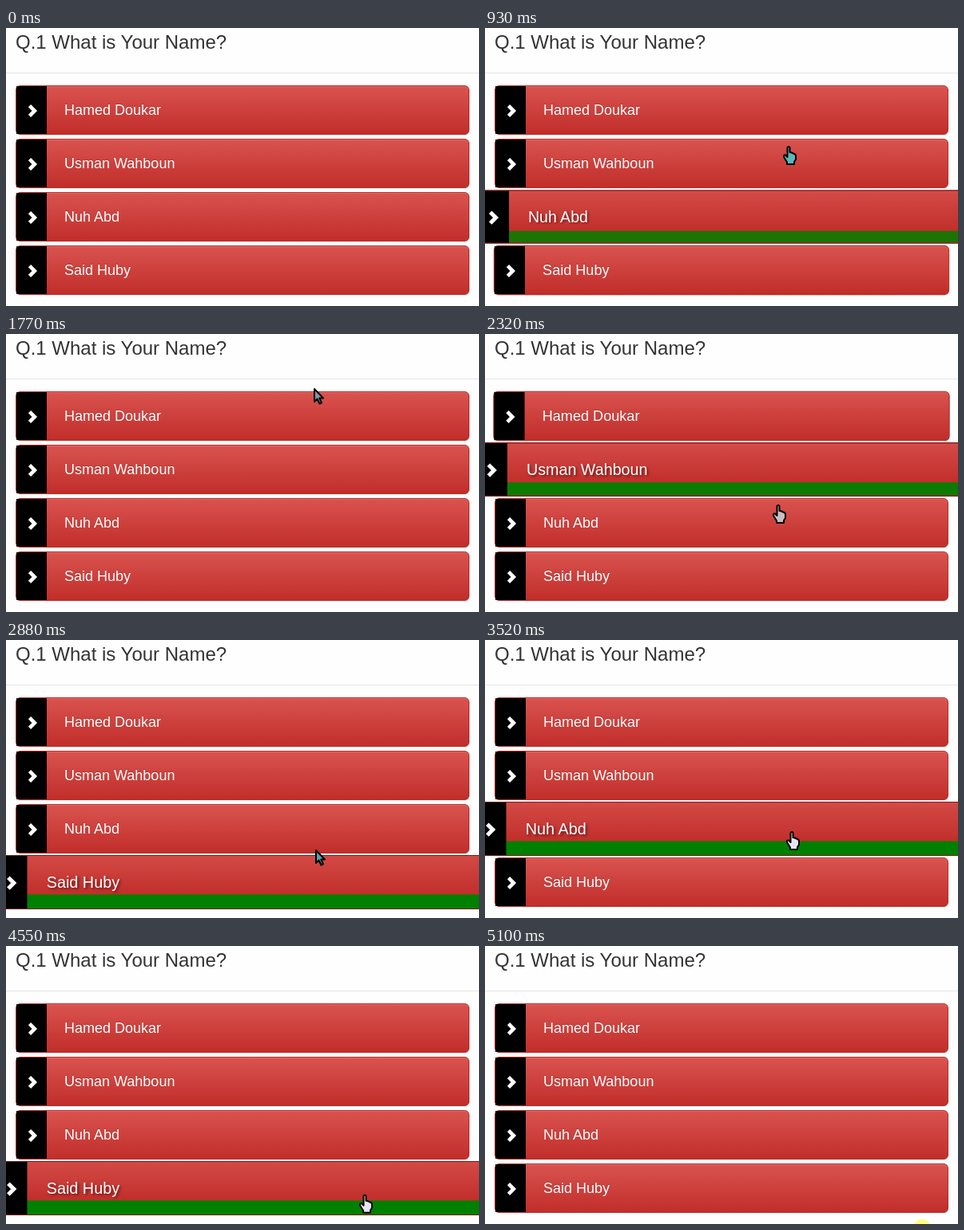
These frames come from a looping animation (592x349 px, 5230 ms). An HTML page:

```html
<!DOCTYPE html>
<html lang="en">
<head>
<meta charset="utf-8">
<title>Question list</title>
<style>
  html, body { margin: 0; width: 100%; height: 100%; overflow: hidden; background: #fefefe; }
  body { position: relative; font-family: "Liberation Sans", Arial, sans-serif; }
  h1 { position: absolute; left: 12px; top: 4px; margin: 0; font: 24px/28px "Liberation Sans", Arial, sans-serif; color: #333; white-space: nowrap; }
  hr { position: absolute; left: 0; top: 56px; width: 100%; height: 1px; margin: 0; border: 0; background: #e5e5e5; }
  .row {
    --p: 0;
    position: absolute; left: 12px; width: 568px; height: 62px; box-sizing: border-box;
    padding-left: 60px; font-size: 18px; line-height: 60px; color: #fff; white-space: nowrap;
    border: 1px solid color-mix(in srgb, #b92c28, #761c19 calc(var(--p) * 100%));
    border-radius: 6px;
    background: #c12e2a linear-gradient(#d9534f, #c12e2a) 0 calc(-15px * var(--p)) repeat-x;
    box-shadow:
      inset 0 calc(-16px * var(--p)) 0 rgba(0, 128, 0, var(--p)),
      inset 0 1px 0 rgba(255, 255, 255, calc(.15 - .15 * var(--p))),
      0 1px 1px rgba(0, 0, 0, .075);
    text-shadow: calc(2px * var(--p)) calc(3px * var(--p) - 1px) calc(3px * var(--p))
      rgba(0, 0, 0, calc(.2 + .3 * var(--p)));
    transform: scale(calc(1 + .1 * var(--p)));
  }
  .row svg { position: absolute; left: 0; top: 0; background: #000; }
  #cursor { position: absolute; left: 0; top: 0; overflow: visible; stroke: #000; stroke-width: 2; stroke-linejoin: round; }
  #halo { position: absolute; left: 536px; top: 343px; width: 22px; height: 22px; border-radius: 50%; background: #ffff80; }
</style>
</head>
<body>
<h1>Q.1 What is Your Name?</h1>
<hr>
<div id="halo"></div>
<script>
const LOOP = 5230, FADE = 300, STEP = 70;
const names = ['Hamed Doukar', 'Usman Wahboun', 'Nuh Abd', 'Said Huby'];

// Row index, hover start, hover end
const hovers = [
  [3, 700, 760], [2, 762, 935], [1, 935, 1050], [0, 1050, 1330],
  [0, 1860, 2110], [1, 2110, 2345], [2, 2345, 2520], [3, 2520, 2900],
  [2, 2910, 4250], [3, 4250, 4700]
];

const HAND = 'M-1.5 2Q0 0 1.5 2V8L4 8.5 6 9.5 8 10.5Q9 11 9 12.5V17L7 20V23H-2V20.5L-6 14Q-6.5 11 -4 11.5L-1.5 14Z';
const ARROW = 'M1 1V17L4.5 13.5 7.5 19.5 10 18.3 7.3 12.5H12Z';

// Time, hotspot x, hotspot y, shape, fill
const path = [
  [650, 392, 300, HAND, '#e8e4f0'],
  [720, 390, 262, HAND, '#5bb5bb'],
  [930, 380, 148, HAND, '#5bb5bb'],
  [1140, 382, 84, HAND, '#8496a8'],
  [1280, 384, 62, ARROW, '#8496a8'],
  [1420, 385, 50, ARROW, '#8496a8'],
  [1770, 385, 68, ARROW, '#8496a8'],
  [1840, 384, 80, HAND, '#c8bfc0'],
  [2040, 378, 140, HAND, '#c8bfc0'],
  [2320, 367, 214, HAND, '#c8bfc0'],
  [2530, 375, 290, HAND, '#c8bfc0'],
  [2740, 384, 300, HAND, '#4fa3ae'],
  [2880, 387, 263, ARROW, '#4fa3ae'],
  [2950, 386, 252, HAND, '#e8e4f0'],
  [3260, 384, 240, HAND, '#e8e4f0'],
  [3520, 384, 240, HAND, '#e8e4f0'],
  [3790, 380, 237, HAND, '#e8e4f0'],
  [4130, 380, 237, HAND, '#e8e4f0'],
  [4250, 388, 262, HAND, '#e8e4f0'],
  [4480, 430, 300, HAND, '#e8e4f0'],
  [4700, 490, 337, ARROW, '#e8e4f0'],
  [5030, 545, 350, ARROW, '#e8e4f0']
];

const rows = names.map((name, i) => {
  const row = document.createElement('div');
  row.className = 'row';
  row.style.top = 72 + 67 * i + 'px';
  row.innerHTML = `<svg width="38" height="60"><path d="M16.5 24.7l6.3 6.3-6.3 6.3"
    fill="none" stroke="#fff" stroke-width="4.6"/></svg>${name}`;
  document.body.append(row);
  return row;
});
document.body.insertAdjacentHTML('beforeend', '<svg id="cursor" width="1" height="1"><path/></svg>');
const cursor = document.querySelector('#cursor path');
const halo = document.getElementById('halo');

// The CSS "ease" curve, solved by bisection
function ease(x) {
  if (x <= 0) return 0;
  if (x >= 1) return 1;
  const bezier = (u, a, b) => 3 * u * (1 - u) ** 2 * a + 3 * u * u * (1 - u) * b + u ** 3;
  let low = 0, high = 1;
  for (let i = 0; i < 24; i++) {
    const mid = (low + high) / 2;
    if (bezier(mid, .25, .25) < x) low = mid; else high = mid;
  }
  return bezier(low, .1, 1);
}

function hoverAmount(index, t) {
  let value = 0;
  for (const [row, start, end] of hovers) {
    if (row !== index || t < start) continue;
    value += (1 - value) * ease((Math.min(t, end) - start) / FADE);
    value *= 1 - ease((t - end) / FADE);
  }
  return value;
}

// The picture advances in steps counted from the start of each burst of movement
function stepped(t) {
  const start = [0, 650, 2320, 2880, 3520, 3990, 5100].findLast(s => s <= t);
  return start + Math.floor((t - start) / STEP) * STEP;
}

function drawCursor(t) {
  const i = path.findLastIndex(key => key[0] <= t);
  const visible = i >= 0 && i < path.length - 1;
  cursor.style.display = visible ? '' : 'none';
  if (!visible) return;
  const [t0, x0, y0, shape, fill] = path[i], [t1, x1, y1] = path[i + 1];
  const k = (t - t0) / (t1 - t0);
  cursor.setAttribute('d', shape);
  cursor.setAttribute('fill', fill);
  cursor.setAttribute('transform', `translate(${x0 + (x1 - x0) * k} ${y0 + (y1 - y0) * k})`);
}

function draw(now) {
  const t = stepped(now % LOOP);
  rows.forEach((row, i) => row.style.setProperty('--p', hoverAmount(i, t).toFixed(4)));
  drawCursor(t);
  halo.style.display = t >= 5100 ? '' : 'none';
}

const begin = performance.now();
function tick() {
  draw(performance.now() - begin);
  requestAnimationFrame(tick);
}
tick();
</script>
</body>
</html>
```
